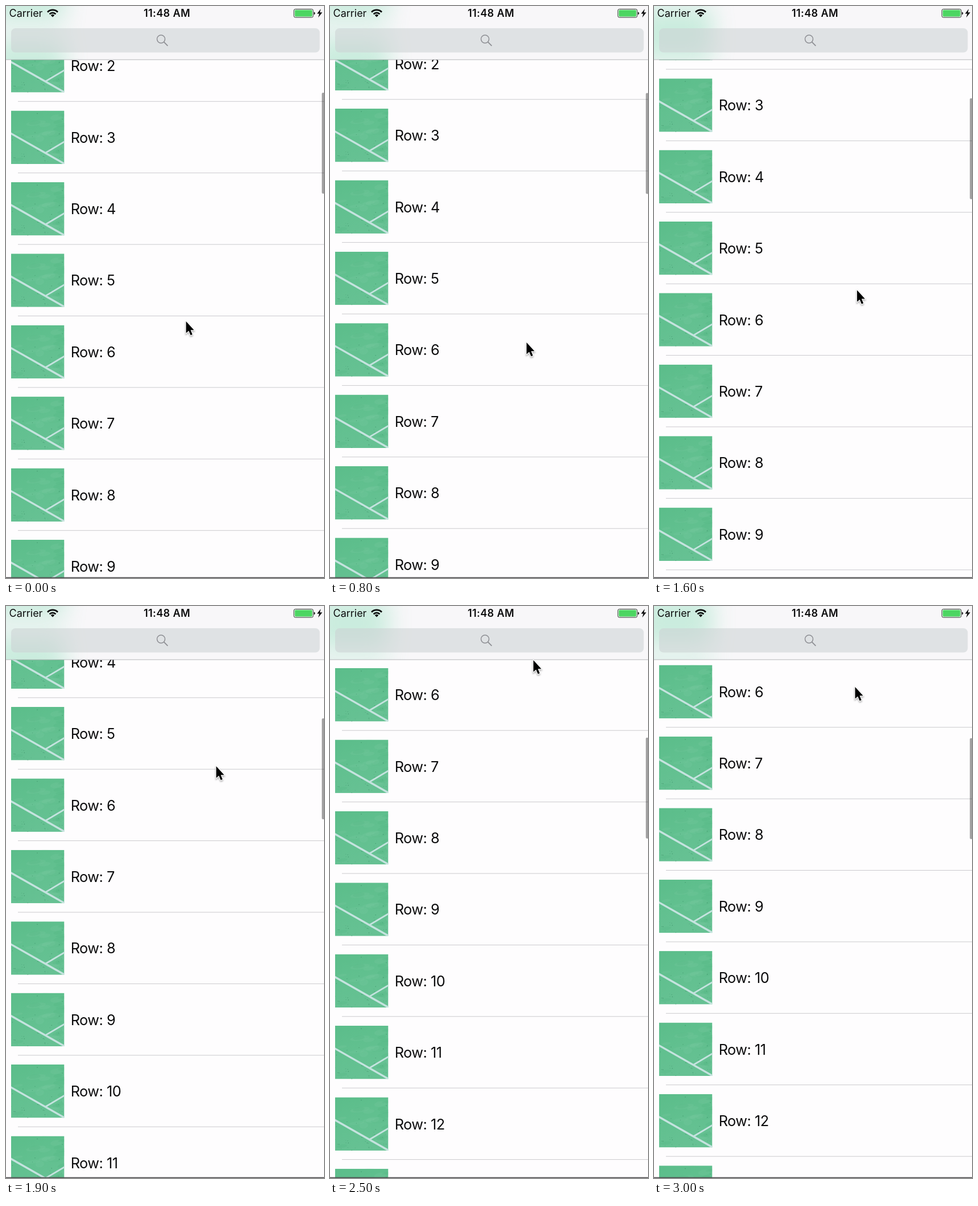
Recreate the animation shown at these times as an HTML page. Size 559 px wide and 1003 px high, loop 3100 ms.

```html
<!DOCTYPE html>
<html lang="en">
<head>
<meta charset="utf-8">
<title>Scrolling list</title>
<style>
  html, body { margin: 0; width: 100%; height: 100%; overflow: hidden; background: #fefdfe; }
  svg { display: block; }
  text { font-family: Inter, "Liberation Sans", sans-serif; fill: #0c0c0d; }
  .label { font-size: 25.3px; letter-spacing: -.5px; }
  .carrier { font-size: 18px; }
  .clock { font-size: 18px; font-weight: 600; letter-spacing: .4px; text-anchor: middle; }
</style>
</head>
<body>
<svg width="559" height="1003" viewBox="0 0 559 1003">
  <defs>
    <linearGradient id="turf" x1="0" y1="0" x2=".35" y2="1">
      <stop offset="0" stop-color="#5bbd8a"/>
      <stop offset=".5" stop-color="#61c08f"/>
      <stop offset="1" stop-color="#66c193"/>
    </linearGradient>
    <filter id="frost" filterUnits="userSpaceOnUse" x="-120" y="-600" width="500" height="2800">
      <feGaussianBlur stdDeviation="20"/>
    </filter>
    <filter id="soft" x="-60%" y="-60%" width="220%" height="220%">
      <feGaussianBlur stdDeviation="1.5"/>
    </filter>
    <clipPath id="barClip"><rect width="559" height="94"/></clipPath>
    <clipPath id="thumbClip"><rect width="93.5" height="93.5"/></clipPath>
    <path id="arrow" d="M0 0V20.5L4.7 16.4L8 24.3L11.2 22.9L8 15.2H14Z"/>
    <g id="thumb" clip-path="url(#thumbClip)">
      <rect width="93.5" height="93.5" fill="url(#turf)"/>
      <g id="grain"></g>
      <g stroke="#c5e3df" fill="none">
        <path d="M-2 39L96 94.5" stroke-width="3.4"/>
        <path d="M60 74.3L96 53" stroke-width="2.8"/>
      </g>
    </g>
  </defs>

  <rect width="559" height="1003" fill="#fefdfe"/>
  <g id="list"></g>

  <g clip-path="url(#barClip)">
    <rect width="559" height="94" fill="#f8f7f9"/>
    <g opacity=".27"><g filter="url(#frost)"><g id="glow" fill="#4fcf94"></g></g></g>
  </g>
  <rect y="93.6" width="559" height="1" fill="#b5b5b8"/>
  <rect x="9" y="39" width="542.5" height="42.5" rx="7.5" fill="#cdd1d4" fill-opacity=".55"/>
  <g fill="none" stroke="#8d8e93" stroke-width="1.5">
    <circle cx="272.5" cy="58" r="7"/>
    <path d="M277.6 63.1L284.3 69.8" stroke-width="1.8"/>
  </g>

  <text class="carrier" x="5.5" y="19">Carrier</text>
  <g fill="none" stroke="#0c0c0d" stroke-width="2.7">
    <path d="M73 10.7A12.6 12.6 0 0 1 91 10.7"/>
    <path d="M76.6 14.2A7.6 7.6 0 0 1 87.4 14.2"/>
  </g>
  <path d="M82 19.5L78.8 16.2A4.5 4.5 0 0 1 85.2 16.2Z" fill="#0c0c0d"/>
  <text class="clock" x="283" y="19">11:48 AM</text>
  <rect x="506" y="5.5" width="34" height="14.5" rx="2.6" fill="none" stroke="#29332b"/>
  <rect x="507.6" y="7.1" width="30.8" height="11.3" rx="1.3" fill="#4cd662"/>
  <path d="M541.3 10.2Q543.4 10.7 543.4 12.7T541.3 15.2Z" fill="#0c0c0d"/>
  <path d="M553.3 5L546.8 13.4H550.7L548.8 20.3L556 11.3H551.8Z" fill="#0c0c0d"/>

  <rect id="thumbBar" x="555.2" width="4.6" height="177" rx="2" fill="#000" fill-opacity=".37"/>
  <rect y="1001.6" width="559" height="1.4" fill="#4b4b4d"/>

  <g id="cursor">
    <use href="#arrow" y="2" fill="#000" stroke="#000" stroke-width="2" opacity=".35" filter="url(#soft)"/>
    <use href="#arrow" fill="#000" stroke="#fff" stroke-width="2.4" stroke-linejoin="round" paint-order="stroke"/>
  </g>
</svg>
<script>
const LOOP = 3100, STEP = 100, PITCH = 125.4, ROWS = 16;
const $ = id => document.getElementById(id);

// time, top of row 3, pointer x, pointer y
const poses = [
  [0, 183.5, 316.5, 553],
  [400, -24.9, 340.5, 358],
  [800, 180, 345.5, 590],
  [1200, 333.5, 337.5, 729],
  [1900, -73.8, 369.5, 281],
  [2500, -267.2, 357.5, 95],
  [3000, -272.7, 353.5, 142]
];

function add(parent, tag, attrs, text) {
  const el = document.createElementNS("http://www.w3.org/2000/svg", tag);
  for (const key in attrs) el.setAttribute(key, attrs[key]);
  if (text) el.textContent = text;
  parent.append(el);
}

let seed = 7;
const rand = () => (seed = seed * 16807 % 2147483647) / 2147483647;

// soft mottling, then dark specks mostly in the lower part
for (let i = 0; i < 24; i++) {
  add($("grain"), "ellipse", {
    cx: rand() * 94, cy: rand() * 94, rx: 6 + rand() * 12, ry: 2 + rand() * 4,
    fill: i % 2 ? "#85cfa8" : "#45ad78", opacity: .16,
    transform: "rotate(-8)"
  });
}
for (let i = 0; i < 38; i++) {
  add($("grain"), "circle", {
    cx: rand() * 94, cy: 94 * Math.sqrt(rand()), r: .4 + rand() * .4,
    fill: "#2d7d57", opacity: .55
  });
}

for (let n = 0; n < ROWS; n++) {
  const top = n * PITCH;
  add($("list"), "use", { href: "#thumb", x: 9, y: top });
  add($("list"), "text", { class: "label", x: 113.7, y: top + 56.2 }, "Row: " + n);
  add($("list"), "rect", { x: 21, y: top + 108.7, width: 538, height: 1, fill: "#cbcace" });
  add($("glow"), "rect", { x: -30, y: top, width: 133, height: 93.5 });
}

const secant = (i, k) => (poses[i + 1][k] - poses[i][k]) / (poses[i + 1][0] - poses[i][0]);

// monotone slope: flat at turning points, harmonic mean elsewhere
function slope(i, k) {
  if (i === 0) return secant(0, k);
  if (i === poses.length - 1) return secant(i - 1, k);
  const a = secant(i - 1, k), b = secant(i, k);
  return a * b <= 0 ? 0 : 2 * a * b / (a + b);
}

function valueAt(t, k) {
  let i = 0;
  while (i < poses.length - 2 && t >= poses[i + 1][0]) i++;
  const p = poses[i], q = poses[i + 1], h = q[0] - p[0], u = (t - p[0]) / h;
  const v = 1 - u;
  return p[k] * v * v * (1 + 2 * u) + q[k] * u * u * (3 - 2 * u)
    + h * u * v * (slope(i, k) * v - slope(i + 1, k) * u);
}

function draw(now) {
  const t = Math.floor(now % LOOP / STEP) * STEP;
  const y = valueAt(t, 1);
  const shift = `translate(0 ${y - 3 * PITCH})`;
  $("list").setAttribute("transform", shift);
  $("glow").setAttribute("transform", shift);
  $("thumbBar").setAttribute("y", 152 + .175 * (183.5 - y));
  $("cursor").setAttribute("transform", `translate(${valueAt(t, 2)} ${valueAt(t, 3)})`);
}

let start;
function tick(now) {
  start ??= now;
  draw(now - start);
  requestAnimationFrame(tick);
}
draw(0);
requestAnimationFrame(tick);
</script>
</body>
</html>
```
